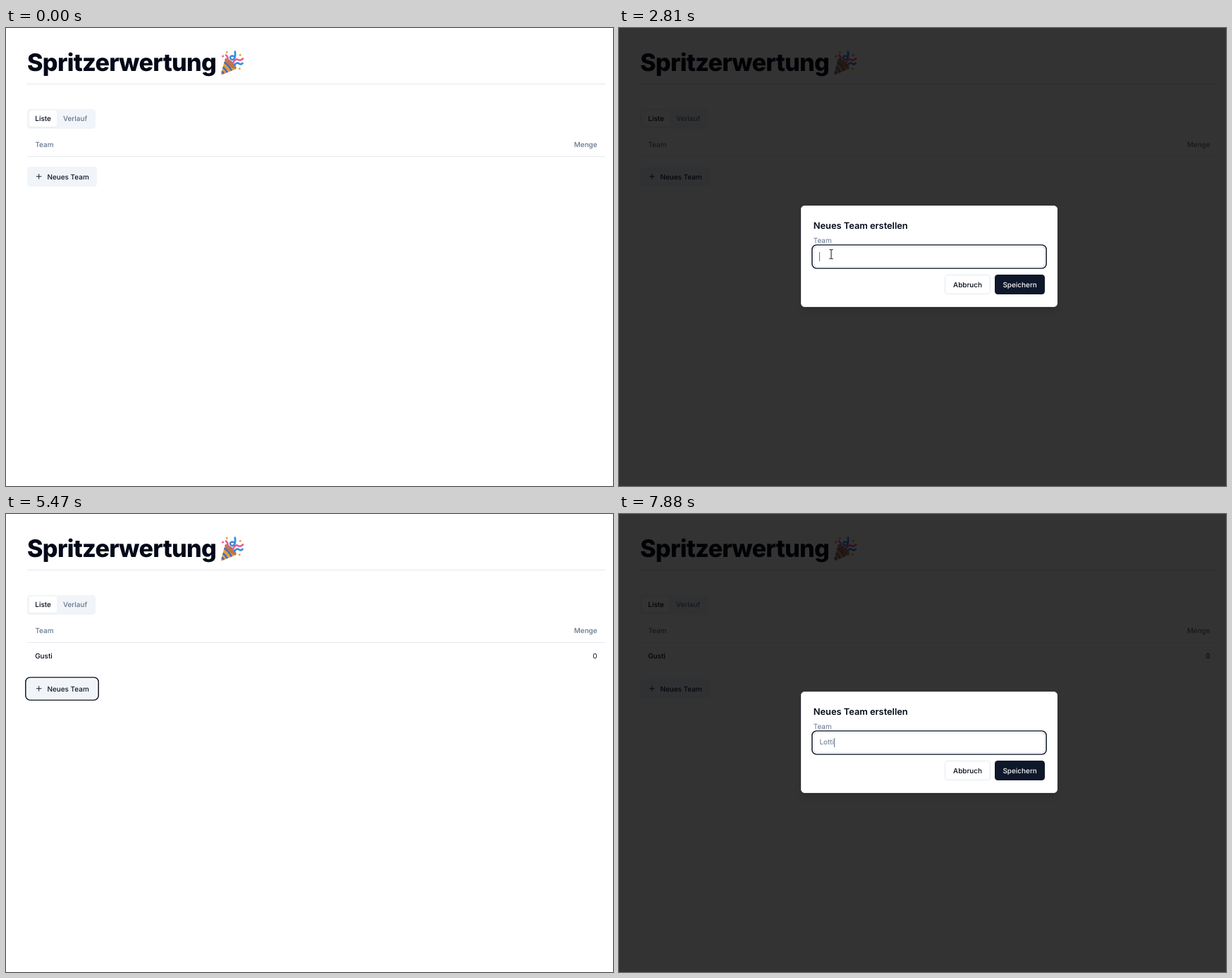
Animation of 861x650 px, one loop 8 s. Source, as an HTML page:

```html
<!DOCTYPE html>
<html lang="de">
<head>
<meta charset="utf-8">
<title>Spritzerwertung</title>
<style>
  * { box-sizing: border-box; }
  html, body { margin: 0; width: 100%; height: 100%; overflow: hidden; background: #fff; }
  body {
    --muted: #64748b; --soft: #f1f5f9; --line: #e4e9f0; --ink: #020817;
    font: 500 9.955px/14px Inter, sans-serif;
    font-optical-sizing: none;
    text-rendering: geometricPrecision;
    color: var(--ink);
  }
  #stage { position: absolute; left: 0; top: 0; width: 861px; height: 650px; overflow: hidden; }
  #stage .at, #dialog > * { position: absolute; white-space: pre; }
  .muted { color: var(--muted); }
  .rule { left: 30px; width: 820px; height: 1px; background: var(--line); }
  .right { right: 22.4px; }
  h1 { margin: 0; left: 30px; top: 29px; font: 800 34.13px/41px Inter, sans-serif; letter-spacing: -.02em; }

  .tabs { left: 30px; top: 114.5px; height: 28.4px; padding: 2.84px; display: flex; border-radius: 4.3px; background: var(--soft); }
  .tabs span { padding: 4.4px 8.53px; border-radius: 2.8px; }
  .tabs .active { background: #fff; color: var(--ink); box-shadow: 0 .7px 1.4px rgba(0, 0, 0, .05); }

  .button { height: 28.4px; padding: 1.6px 11.38px 0; display: flex; align-items: center; border-radius: 4.3px; }
  #add { left: 30px; top: 197px; background: var(--soft); color: #0f172a; }
  #add svg { width: 11.4px; height: 11.4px; margin: -2.6px 5.69px 0 0; }
  #add.shifted { top: 234px; }
  .focus { box-shadow: 0 0 0 1.42px #fff, 0 0 0 2.84px var(--ink); }

  #overlay { inset: 0; background: #000; }
  #stage #dialog {
    left: 258px; top: 252.4px; width: 364px; height: 143.5px;
    border-radius: 5.7px; background: #fff;
    box-shadow: inset 0 0 0 .7px #e2e8f0, 0 7px 11px -2px rgba(0, 0, 0, .1), 0 3px 4px -3px rgba(0, 0, 0, .1);
  }
  #heading { left: 17.8px; top: 19.2px; font: 600 12.8px/20px Inter, sans-serif; }
  #label { left: 17.8px; top: 42.2px; font-weight: 400; }
  #input {
    left: 17.8px; top: 57.8px; width: 328.4px; height: 28.4px; padding-left: 7.6px;
    display: flex; align-items: center; font-weight: 400;
    border: 1px solid var(--line); border-radius: 4.3px; color: var(--muted);
  }
  #caret { width: 1px; height: 13px; background: #64748b; }
  #footer { right: 17.8px; top: 97.7px; display: flex; gap: 5.69px; }
  #cancel { border: 1px solid var(--line); }
  #save { background: #0f172a; color: #f8fafc; }
  #stage svg { display: block; overflow: visible; }
</style>
</head>
<body>
<div id="stage">
  <h1 class="at">Spritzerwertung</h1>
  <svg class="at" style="left:304px;top:32px" width="34" height="35" fill="none" stroke-linecap="round">
    <path d="M1 33.2 7 11Q17 14 22.5 26L2.4 34.2Q.6 34.8 1 33.2Z" fill="#e39c45"/>
    <g stroke="#3f6cc4" stroke-width="2.6" stroke-linecap="butt">
      <path d="M5.6 16.5Q12 21 16 28.5M3.7 23.5Q7.6 26.5 9.8 31.1M2 29.5Q4 31 5 33"/>
    </g>
    <ellipse cx="14.7" cy="18.6" rx="10.6" ry="3.6" transform="rotate(43 14.7 18.6)" fill="#b9784b"/>
    <g stroke-width="2.7">
      <path d="M8 6.5Q11.5 9 10.5 15" stroke="#ef5a94"/>
      <path d="M20.8 1.5Q22 7 19.8 11.5Q16 15 14 10.5Q13.8 6.5 19.5 8" stroke="#3a8de0"/>
      <path d="M18 17.5Q21.5 10.5 25 13Q28 15 32 11.5" stroke="#ef5a94"/>
      <path d="M20 20.5Q24 16 26.5 18.5Q29 20.5 31.5 18" stroke="#3a8de0"/>
    </g>
    <circle cx="9.3" cy="2.2" r="1.5" fill="#e8a33c"/>
    <circle cx="28.2" cy="6.2" r="1.5" fill="#e8a33c"/>
    <circle cx="3.6" cy="8" r="1.5" fill="#ef5a94"/>
    <circle cx="27.3" cy="25.7" r="1.5" fill="#e8a33c"/>
  </svg>
  <div class="at rule" style="top:79px"></div>

  <div class="at tabs muted"><span class="active">Liste</span><span>Verlauf</span></div>

  <div class="at muted" style="left:41.4px;top:159px">Team</div>
  <div class="at muted right" style="top:159px">Menge</div>
  <div class="at rule" style="top:182px"></div>
  <div id="row">
    <div class="at" style="left:41.2px;top:195px">Gusti</div>
    <div class="at right" style="top:195px;font-weight:400">0</div>
  </div>

  <div id="add" class="at button">
    <svg viewBox="0 0 24 24" fill="none" stroke="#0f172a" stroke-width="2" stroke-linecap="round"><path d="M5 12H19M12 5V19"/></svg>
    <span>Neues Team</span>
  </div>

  <div id="overlay" class="at"></div>
  <div id="dialog" class="at">
    <div id="heading">Neues Team erstellen</div>
    <div id="label" class="muted">Team</div>
    <div id="input"><span id="text"></span><span id="caret"></span></div>
    <div id="footer">
      <div id="cancel" class="button">Abbruch</div>
      <div id="save" class="button">Speichern</div>
    </div>
  </div>

  <svg id="pointer" class="at" style="left:0;top:0" width="10" height="15">
    <path id="arrow" d="M.4.6V11.8L3 9.5 4.7 13.4 6.6 12.6 4.9 8.8H8.4Z" fill="#fff" stroke="#000" stroke-width=".75"/>
    <path id="beam" d="M-2.5-6.5H-.7L0-6 .7-6.5H2.5M0-6V6M-2.5 6.5H-.7L0 6 .7 6.5H2.5" fill="none" stroke="#111"/>
  </svg>
</div>

<script>
const LOOP = 8000, STEP = 1000 / 15, FADE = 200;
const $ = id => document.getElementById(id);
const ui = Object.fromEntries(
  ['row', 'add', 'overlay', 'dialog', 'input', 'text', 'caret', 'cancel', 'save', 'pointer', 'arrow', 'beam']
    .map(id => [id, $(id)]));

// Each schedule lists [time in ms, value from then on].
const focus = [[0, ''], [2740, 'input'], [4810, 'cancel'], [4940, 'save'], [5460, 'add'],
  [6060, 'cancel'], [6540, 'save'], [6730, 'input']];
const typed = [[0, ''], ...typing('Gusti', [3800, 4070, 4200, 4340, 4610]), [5460, ''],
  ...typing('Lotti', [7280, 7480, 7550, 7750, 7820])];
const caretOn = [[0, false], [2740, true], [3270, false], [4070, true], [4340, false],
  [4610, true], [4810, false], [6730, true]];
const dialogs = [{ open: 1857, close: 5255 }, { open: 6014, close: Infinity }];

// Pointer stops: [step, x, y, easing towards this stop].
const linear = p => p;
const easeOut = p => 1 - (1 - p) ** 2;
const smooth = p => p * p * (3 - 2 * p);
const stops = [[4, 809, 640], [14, 58, 209, easeOut], [15, 58, 209], [16, 62, 213], [19, 62, 213],
  [20, 60, 212], [22, 55, 212], [25, 55, 212], [26, 59, 208], [30, 59, 208], [39, 301, 321, smooth]];
const POINTER_HIDES = 3800;

function typing(word, times) {
  return times.map((time, i) => [time, word.slice(0, i + 1)]);
}

function valueAt(schedule, t) {
  return schedule.findLast(([time]) => time <= t)[1];
}

// The CSS "ease" curve, cubic-bezier(.25, .1, .25, 1).
function ease(x) {
  if (x <= 0 || x >= 1) return Math.min(1, Math.max(0, x));
  const bezier = (a, b, u) => 3 * a * u * (1 - u) ** 2 + 3 * b * u * u * (1 - u) + u ** 3;
  let low = 0, high = 1;
  for (let i = 0; i < 24; i++) {
    const mid = (low + high) / 2;
    if (bezier(.25, .25, mid) < x) low = mid; else high = mid;
  }
  return bezier(.1, 1, low);
}

function openness(t) {
  const current = dialogs.findLast(d => d.open <= t);
  if (!current) return 0;
  return t < current.close
    ? ease((t - current.open) / FADE)
    : 1 - ease((t - current.close) / FADE);
}

function pointerAt(step) {
  const i = stops.findIndex(stop => stop[0] > step);
  if (i < 0) return stops.at(-1).slice(1, 3);
  const [s0, x0, y0] = stops[i - 1], [s1, x1, y1, easing = linear] = stops[i];
  const p = easing((step - s0) / (s1 - s0));
  return [x0 + (x1 - x0) * p, y0 + (y1 - y0) * p];
}

function show(element, visible) {
  element.style.visibility = visible ? 'visible' : 'hidden';
}

function drawDialog(t) {
  const open = openness(t), rest = 1 - open;
  show(ui.overlay, open > 0);
  show(ui.dialog, open > 0);
  ui.overlay.style.opacity = .8 * open;
  ui.dialog.style.opacity = open;
  ui.dialog.style.transform = rest ? `translateY(${2 * rest}%) scale(${1 - .05 * rest})` : 'none';
}

function drawPointer(step, t) {
  const visible = step >= stops[0][0] && t < POINTER_HIDES;
  ui.pointer.style.display = visible ? 'block' : 'none';
  if (!visible) return;
  const [x, y] = pointerAt(step).map(Math.round);
  const overInput = x > 275 && x < 604 && y > 310 && y < 339;
  ui.pointer.style.transform = `translate(${x}px, ${y}px)`;
  ui.arrow.style.display = overInput ? 'none' : '';
  ui.beam.style.display = overInput ? '' : 'none';
}

function draw(t) {
  const step = Math.floor((t + 7) / STEP);
  const focused = valueAt(focus, t);
  const added = t >= 5260;
  for (const id of ['add', 'input', 'cancel', 'save']) ui[id].classList.toggle('focus', id === focused);
  ui.add.classList.toggle('shifted', added);
  ui.row.style.display = added ? '' : 'none';
  ui.text.textContent = valueAt(typed, t);
  ui.caret.style.display = valueAt(caretOn, t) ? '' : 'none';
  drawDialog(step * STEP);
  drawPointer(step, t);
}

const start = performance.now();
function tick() {
  draw((performance.now() - start) % LOOP);
  requestAnimationFrame(tick);
}
tick();
</script>
</body>
</html>
```
